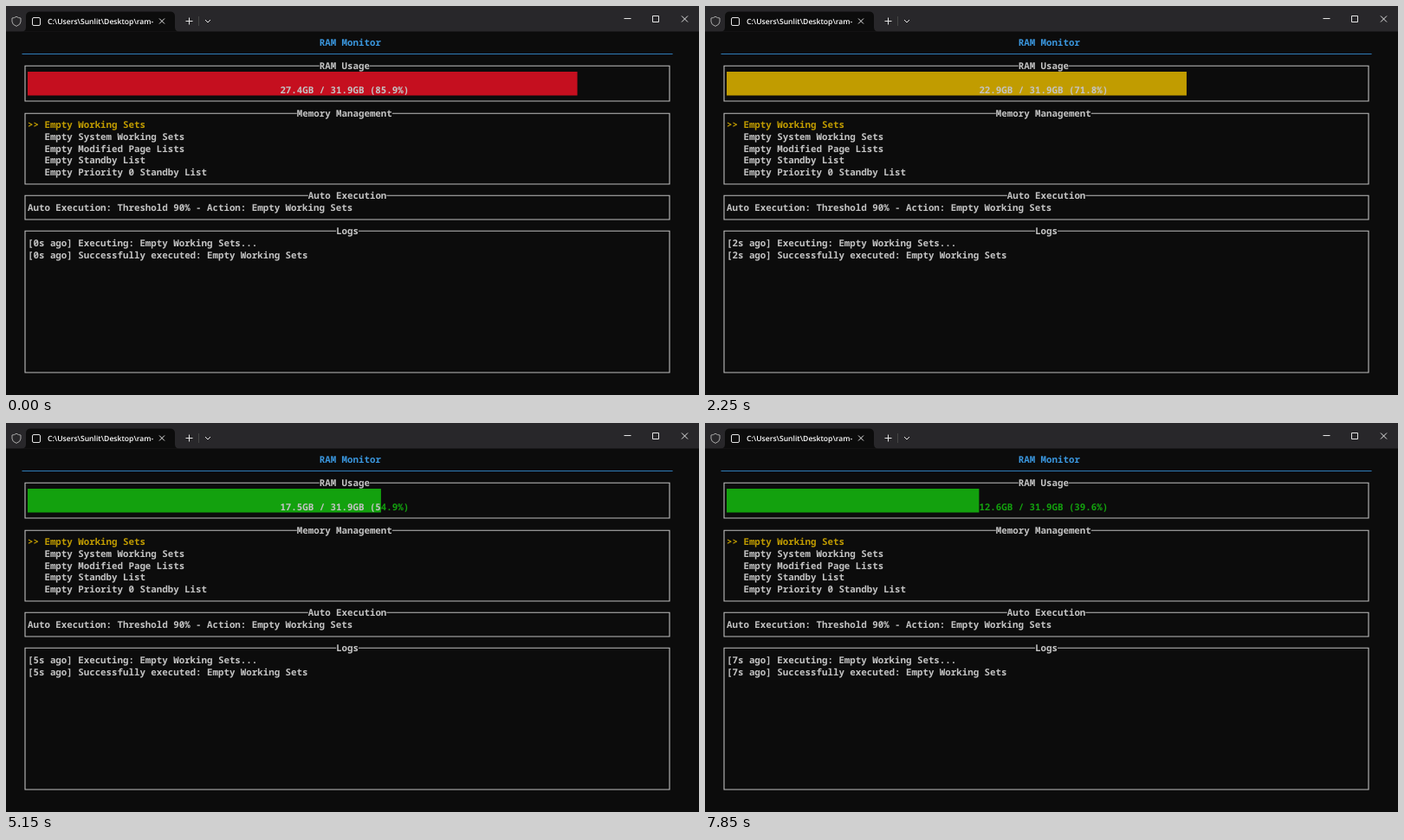
An HTML page for the animation above (8 s loop, 800 by 450 pixels).

```html
<!DOCTYPE html>
<html lang="en">
<head>
<meta charset="utf-8">
<title>RAM Monitor</title>
<style>
  html, body { margin: 0; width: 100%; height: 100%; overflow: hidden; background: #0c0c0c; }
  svg { display: block; width: 800px; height: 450px; }
  text { white-space: pre; text-rendering: geometricPrecision; }
  .term text { font: 600 10.79px "Noto Sans Mono", "DejaVu Sans Mono", monospace; fill: #c4c4c4; }
  .term .cyan { fill: #3a96dd; }
  .term .yellow { fill: #c19c00; }
  .tab { font: 600 8.6px "Open Sans", "Noto Sans", sans-serif; fill: #fff; }
  .frame { fill: none; stroke: #bebebe; stroke-width: 1.1; }
  .icon { fill: none; stroke: #e4e4e4; stroke-width: 1; }
</style>
</head>
<body>
<svg viewBox="0 0 800 450">
  <rect width="800" height="450" fill="#0c0c0c"/>
  <rect width="800" height="29.5" fill="#28272a"/>
  <path d="M18 29.5Q23 29.5 23 24.5V12Q23 6.5 28.5 6.5H189.5Q195 6.5 195 12V24.5Q195 29.5 200 29.5Z" fill="#0c0c0c"/>
  <path class="icon" style="stroke:#a8a8a8" d="M12 12.2Q14.3 14 17 14V18Q17 21.6 12 23.4Q7 21.6 7 18V14Q9.700 14 12 12.200Z"/>
  <rect class="icon" x="30.500" y="13.500" width="9" height="9" rx="1.500"/>
  <text class="tab" x="48" y="21.400">C:\Users\Sunlit\Desktop\ram-</text>
  <path class="icon" d="M177 14.500l6 6m0-6l-6 6M207.500 17.500h8m-4-4v8M230 16l3 3l3-3"/>
  <path class="icon" style="stroke:#444" d="M222.500 12v11"/>
  <path class="icon" d="M713.500 14.500h8M746.500 11.500h7v7h-7zM780 11.500l7 7m0-7l-7 7"/>
  <g class="term" id="term">
    <path d="M18.500 55.500H769.600" stroke="#2f7db9" stroke-width="1.100"/>
    <rect id="bar" x="25" y="76" height="27.500"/>
  </g>
</svg>
<script>
  const LOOP = 8000, COLS = 114, LABEL_COL = 45;
  const CELL = 6.475, LINE = 13.65;
  const term = document.getElementById('term');
  const bar = document.getElementById('bar');

  const colX = c => 25 + c * CELL;
  const rowY = r => 42 + r * LINE;

  function add(parent, tag, attrs, content = '') {
    const el = document.createElementNS('http://www.w3.org/2000/svg', tag);
    for (const k in attrs) el.setAttribute(k, attrs[k]);
    el.textContent = content;
    parent.appendChild(el);
    return el;
  }

  const print = (row, col, content, cls = '') =>
    add(term, 'text', { x: colX(col), y: rowY(row) + 3.9, class: cls }, content);

  // Bordered panel with a title set into its top edge
  function panel(title, col, top, bottom) {
    const left = 22, right = 766, y1 = Math.round(rowY(top)) + 0.3, y2 = Math.round(rowY(bottom));
    add(term, 'path', {
      class: 'frame',
      d: `M${colX(col)} ${y1}H${left}V${y2}H${right}V${y1}H${colX(col + title.length)}`
    });
    print(top, col, title);
  }

  print(0, 52, 'RAM Monitor', 'cyan');
  panel('RAM Usage', 52, 2, 5);
  panel('Memory Management', 48, 6, 12);
  panel('Auto Execution', 50, 13, 15);
  panel('Logs', 55, 16, 28);

  print(7, 0, '>> Empty Working Sets', 'yellow');
  ['System Working Sets', 'Modified Page Lists', 'Standby List', 'Priority 0 Standby List']
    .forEach((name, i) => print(8 + i, 3, 'Empty ' + name));
  print(14, 0, 'Auto Execution: Threshold 90% - Action: Empty Working Sets');

  const logs = ['Executing: Empty Working Sets...', 'Successfully executed: Empty Working Sets']
    .map((message, i) => ({ message, el: print(17 + i, 0, '') }));
  const label = print(4, LABEL_COL, '');
  const inside = add(label, 'tspan', {});
  const outside = add(label, 'tspan', {});

  // [start ms, GB used, percent]
  const samples = [
    [0, 27.4, 85.9], [50, 27.1, 85.0], [550, 26.9, 84.3], [1050, 26.3, 82.4],
    [1600, 24.1, 75.5], [2100, 22.9, 71.8], [2600, 21.6, 67.7], [3100, 20.4, 64.0],
    [3650, 20.3, 63.5], [4150, 19.6, 61.4], [4650, 18.5, 58.0], [5150, 17.5, 54.9],
    [5650, 16.6, 52.0], [6200, 15.6, 48.8], [6700, 14.7, 46.1], [7200, 13.6, 42.6],
    [7700, 12.6, 39.6]
  ];

  const level = pct => pct >= 80 ? '#c50f1f' : pct >= 70 ? '#c19c00' : '#13a10e';

  function show(i) {
    const [, used, pct] = samples[i];
    const cells = Math.round(pct / 100 * COLS);
    const content = `${used.toFixed(1)}GB / 31.9GB (${pct.toFixed(1)}%)`;
    const covered = Math.max(0, cells - LABEL_COL);
    const age = Math.max(0, Math.floor((i - 1) / 2));

    bar.setAttribute('width', cells * CELL);
    bar.setAttribute('fill', level(pct));
    inside.textContent = content.slice(0, covered);
    outside.textContent = content.slice(covered);
    outside.setAttribute('fill', level(pct));
    outside.style.fill = level(pct);
    for (const { el, message } of logs) el.textContent = `[${age}s ago] ${message}`;
  }

  let shown = -1;
  const start = performance.now();
  function tick() {
    const t = (performance.now() - start) % LOOP;
    const i = samples.findLastIndex(s => s[0] <= t);
    if (i !== shown) show(shown = i);
    requestAnimationFrame(tick);
  }
  tick();
</script>
</body>
</html>
```
